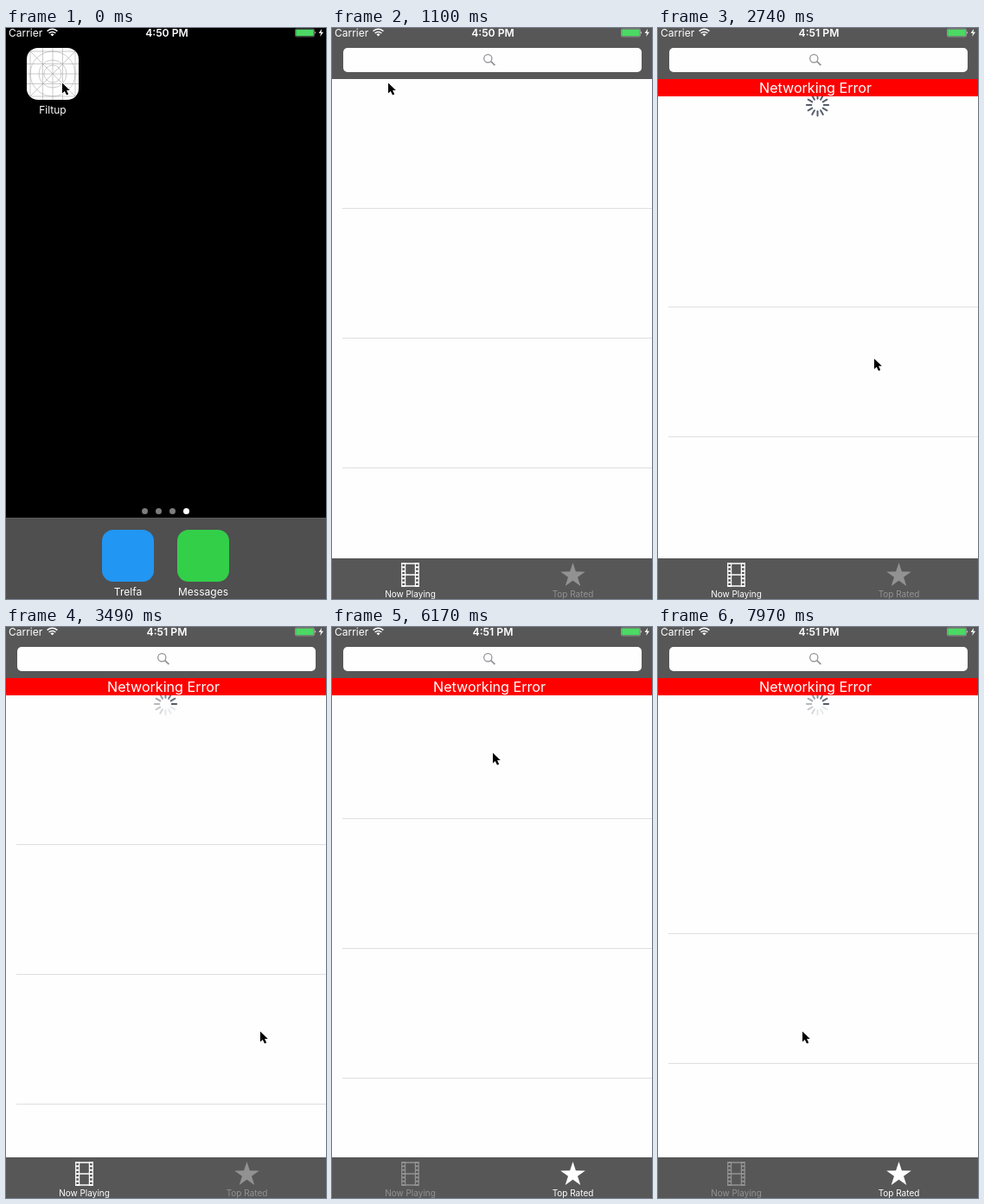
Write an HTML page that moves like this. It is 370 by 660 pixels and loops after 8000 ms.

```html
<!DOCTYPE html>
<html lang="en">
<head>
<meta charset="utf-8">
<title>Pull to refresh</title>
<style>
  html, body { margin: 0; width: 100%; height: 100%; overflow: hidden; background: #000; }
  svg { display: block; width: 370px; height: 660px; }
  text { font-family: Inter, Roboto, sans-serif; fill: currentColor; }
  .mid { text-anchor: middle; }
</style>
</head>
<body>
<svg id="stage" viewBox="0 0 370 660">
  <defs>
    <g id="status">
      <text x="3" y="9.6" font-size="12">Carrier</text>
      <g fill="none" stroke="currentColor" stroke-width="1.5">
        <path d="M47.6 3.6Q53.5 -1 59.4 3.6M49.6 6Q53.5 3 57.4 6"/>
        <path d="M51.4 7.4Q53.5 5.8 55.6 7.4L53.5 9.6Z" fill="currentColor" stroke="none"/>
      </g>
      <rect x="334.5" y="1" width="22" height="9" rx="1.4" fill="none" stroke="currentColor" stroke-opacity=".45" stroke-width=".8"/>
      <rect x="335.2" y="1.7" width="20.6" height="7.6" rx=".7" fill="#4cd964"/>
      <path d="M357.4 3.8Q359 5.4 357.4 7Z" fill="currentColor"/>
      <path d="M365 1L361.6 6H364L363.2 10L367 4.8H364.5Z" fill="currentColor"/>
    </g>
    <clipPath id="tile"><rect x="-30" y="-30" width="60" height="60" rx="13"/></clipPath>
  </defs>

  <rect width="370" height="660"/>

  <g id="home" color="#fff">
    <g transform="translate(54 53)" clip-path="url(#tile)">
      <rect x="-30" y="-30" width="60" height="60" fill="#fff"/>
      <g id="guides" fill="none" stroke="#aaa" stroke-width=".6"></g>
      <rect id="press" x="-30" y="-30" width="60" height="60" opacity=".45"/>
    </g>
    <text class="mid" x="54" y="99" font-size="12">Filtup</text>
    <g id="dots"></g>
    <rect y="566" width="370" height="94" fill="#4f4f4f"/>
    <rect y="566" width="370" height="1" fill="#5a5a5a"/>
    <rect x="111" y="580" width="60" height="60" rx="13" fill="#2196f3"/>
    <rect x="198" y="580" width="60" height="60" rx="13" fill="#33cf49"/>
    <text class="mid" x="141" y="656" font-size="12">Trelfa</text>
    <text class="mid" x="228" y="656" font-size="12">Messages</text>
  </g>

  <g id="ghost" color="#fff" opacity=".17"><use href="#status"/></g>
  <g id="launch"><rect x="-3.2" y="-3.8" width="374" height="659" rx="8" fill="#fefefe"/></g>

  <g id="app">
    <rect width="370" height="660" fill="#fefefe"/>
    <g id="chrome">
      <g id="rows" fill="#dfdfe0">
        <rect x="12" y="208" width="358" height="1"/>
        <rect x="12" y="358" width="358" height="1"/>
        <rect x="12" y="508" width="358" height="1"/>
      </g>
      <g id="spinner" transform="translate(184.5 89)" stroke="#565d69" stroke-width="2" stroke-linecap="round"></g>
      <rect width="370" height="59" fill="#575757"/>
      <rect x="13" y="23" width="345" height="28" rx="5" fill="#fefefe"/>
      <g fill="none" stroke="#8e8e93" stroke-width="1.2">
        <circle cx="180.3" cy="35.3" r="4.6"/>
        <path d="M183.7 38.7L188.4 43.2" stroke-width="1.6"/>
      </g>
      <g id="error" color="#fff">
        <rect y="59" width="370" height="20" fill="#f00"/>
        <text class="mid" x="182" y="75" font-size="16.1">Networking Error</text>
      </g>
      <rect y="613" width="370" height="47" fill="#575757"/>
      <g id="playing">
        <g fill="none" stroke="currentColor">
          <path d="M80.7 618V646M84.6 618V646M96.4 618V646M100.3 618V646" stroke-width="1.2"/>
          <path d="M82.6 618V646M98.4 618V646" stroke-width="3" stroke-dasharray="2 2.33"/>
          <path d="M84 619H97M84 632H97M84 645H97" stroke-width="1.6"/>
        </g>
        <text class="mid" x="90.5" y="658.3" font-size="10">Now Playing</text>
      </g>
      <g id="rated">
        <path id="star" fill="currentColor"/>
        <text class="mid" x="278.5" y="658.3" font-size="10">Top Rated</text>
      </g>
    </g>
  </g>

  <g id="bar">
    <use href="#status"/>
    <text id="clock" class="mid" x="186" y="9.8" font-size="12.2" font-weight="600"></text>
  </g>

  <g id="cursor">
    <path id="arrow" d="M0 .5V12.6L2.8 10L5 14.6L7.2 13.6L5.1 9.1H8.8Z" stroke="#fff" stroke-width="1.8" paint-order="stroke"/>
  </g>
</svg>
<script>
const LOOP = 8000, FIRST = 490, STEP = 149.4;
const $ = id => document.getElementById(id);
const show = (id, on) => { $(id).style.display = on ? '' : 'none'; };
const move = (id, x, y, s = 1) => $(id).setAttribute('transform', `translate(${x} ${y}) scale(${s})`);

function add(parent, tag, attrs) {
  const node = document.createElementNS('http://www.w3.org/2000/svg', tag);
  for (const key in attrs) node.setAttribute(key, attrs[key]);
  return $(parent).appendChild(node);
}

// Pointer travel in steps: each move eases from the last place to (x, y).
const REST = { x: 65, y: 63 };
const MOVES = [
  { from: 6.65, to: 8, x: 189, y: 121 },
  { from: 13.4, to: 16, x: 280, y: 510 },
  { from: 18, to: 20, x: 294, y: 467 },
  { from: 20, to: 26, x: 279, y: 635 },
  { from: 31, to: 35, x: 187, y: 119 },
  { from: 37, to: 42, x: 177, y: 368 },
  { from: 42, to: 50, x: 167, y: 467 }
];
const smooth = k => k * k * (3 - 2 * k);

function pointer(n) {
  let { x, y } = REST;
  for (const m of MOVES) {
    const k = smooth(Math.min(1, Math.max(0, (n - m.from) / (m.to - m.from))));
    x += (m.x - x) * k;
    y += (m.y - y) * k;
  }
  return { x, y };
}

// The list resists the drag like rubber and springs back on release.
const RELEASE = 20, SECOND_GRAB = 37;
function pullAt(n, y) {
  if (n >= RELEASE && n < SECOND_GRAB) return 43 * .2 ** (n - RELEASE);
  const drag = n < 13 ? 0 : Math.max(0, y - 119);
  return 1000 * drag / (drag + 2035);
}

for (const r of [26, 16, 10]) add('guides', 'circle', { r });
for (const p of [-26, -11.5, 0, 11.5, 26]) add('guides', 'path', { d: `M${p} -30V30M-30 ${p}H30` });
add('guides', 'path', { d: 'M-27 -27L27 27M-27 27L27 -27' });
for (let i = 0; i < 4; i++) {
  add('dots', 'circle', { cx: 160.5 + 16 * i, cy: 558.5, r: 3.5, fill: i < 3 ? '#7d7d7d' : '#fff' });
}
const ticks = Array.from({ length: 12 }, (_, i) =>
  add('spinner', 'path', { d: 'M0 -7.2V-12.6', transform: `rotate(${i * 30})` }));
$('star').setAttribute('d', 'M' + Array.from({ length: 10 }, (_, i) => {
  const r = i % 2 ? 5.8 : 15, a = i * Math.PI / 5;
  return [278.5 + r * Math.sin(a), 633 - r * Math.cos(a)].map(v => v.toFixed(1)).join(' ');
}).join('L') + 'Z');

// Ticks appear with the pull, then turn once a second while refreshing.
function drawSpinner(n, pull) {
  const spinning = (n >= 16 && n < 22) || n >= 44;
  const head = 3 + Math.round((n - (n < 30 ? 20 : 50)) * STEP * 12 / 1000);
  const shown = Math.floor((pull - 25) / 80 * 12);
  show('spinner', spinning ? pull > 5 : shown > 0);
  ticks.forEach((tick, i) => {
    const age = ((head - i) % 12 + 12) % 12;
    tick.setAttribute('opacity', spinning ? Math.max(.13, 1 - age * .095) : +(i < shown));
  });
}

function draw(t) {
  const n = Math.max(-1, Math.floor((t - FIRST) / STEP));
  const launching = n === 1 || n === 2;
  show('home', n < 1);
  show('press', n === 0);
  show('ghost', n === 1);
  show('launch', launching);
  show('app', n >= 3);
  show('chrome', n >= 4);
  show('error', n >= 6);

  const gap = launching ? .136 * .1 ** (n - 1) : 0;
  for (const id of ['launch', 'bar']) move(id, 31 * gap, 24 * gap, 1 - gap);
  $('bar').setAttribute('color', n >= 1 && n < 4 ? '#111' : '#fff');
  $('clock').textContent = n < 13 ? '4:50 PM' : '4:51 PM';

  const { x, y } = pointer(n);
  const pull = pullAt(n, y);
  move('cursor', x, y);
  move('rows', 0, Math.round(pull));
  drawSpinner(n, pull);

  $('playing').setAttribute('color', n < 30 ? '#fff' : '#929292');
  $('rated').setAttribute('color', n < 30 ? '#929292' : '#fff');
}

let start;
function tick(now) {
  start ??= now;
  draw((now - start) % LOOP);
  requestAnimationFrame(tick);
}
draw(0);
requestAnimationFrame(tick);
</script>
</body>
</html>
```
